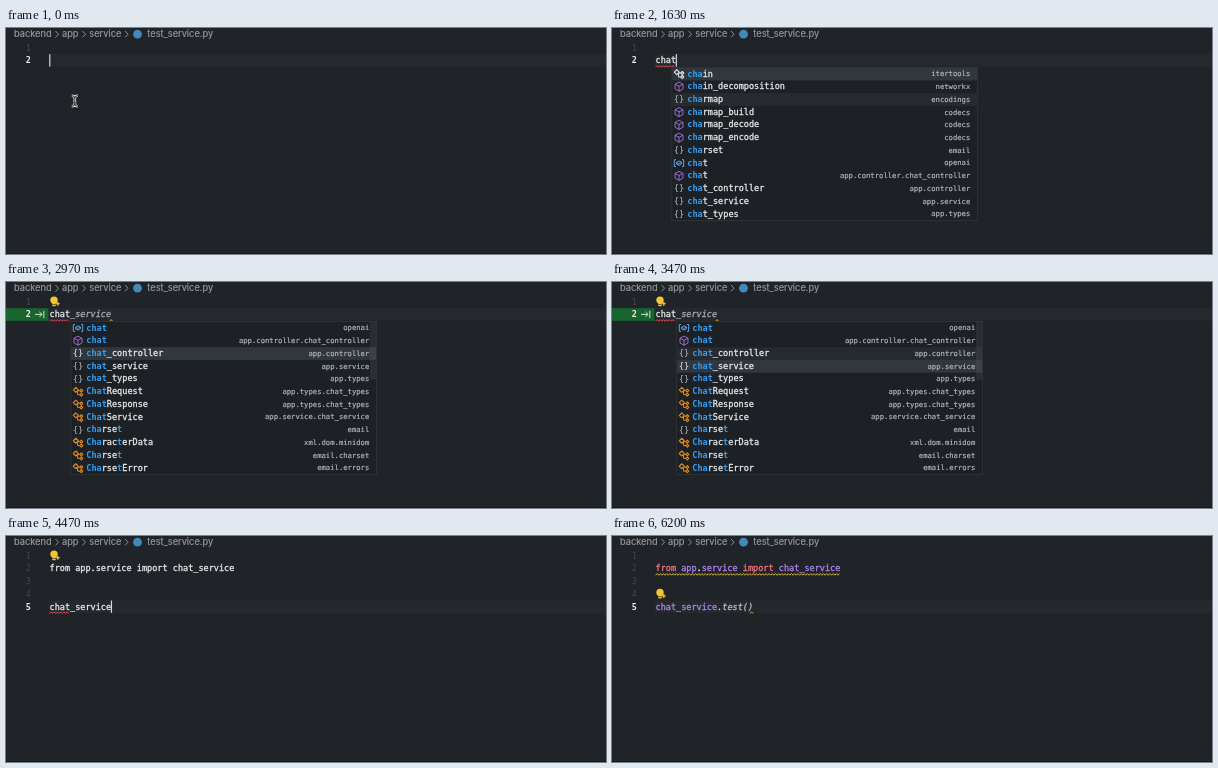
Recreate the animation shown at these times as an HTML page with a canvas. Size 600 by 226 pixels, loop 6.29 s.

```html
<!DOCTYPE html>
<html lang="en">
<head>
<meta charset="utf-8">
<title>Code completion</title>
<style>
html, body { margin: 0; width: 100%; height: 100%; overflow: hidden; background: #202327; }
canvas { display: block; width: 600px; height: 226px; }
</style>
</head>
<body>
<canvas id="stage"></canvas>
<script>
const LOOP = 6290, CH = 5.137, LEFT = 43.5, ROW = 12.74;
const MONO = '"DejaVu Sans Mono", monospace';
const SANS = 'Inter, "Open Sans", sans-serif';
const C = {
  bg: '#202327', line: '#25292d', text: '#e6e9ec', dim: '#41464c', crumb: '#989ca1',
  purple: '#ab85ea', pink: '#f07581', blue: '#319ff2', orange: '#e08a1e',
  red: '#e5484d', yellow: '#d9b52c', ghost: '#a9adb2'
};

const canvas = document.getElementById('stage');
const g = canvas.getContext('2d');
const dpr = window.devicePixelRatio || 1;
canvas.width = 600 * dpr;
canvas.height = 226 * dpr;

// label, module, icon kind
const firstList = [
  ['chain', 'itertools', 'class'], ['chain_decomposition', 'networkx', 'cube'],
  ['charmap', 'encodings', 'module'], ['charmap_build', 'codecs', 'cube'],
  ['charmap_decode', 'codecs', 'cube'], ['charmap_encode', 'codecs', 'cube'],
  ['charset', 'email', 'module'], ['chat', 'openai', 'var'],
  ['chat', 'app.controller.chat_controller', 'cube'],
  ['chat_controller', 'app.controller', 'module'],
  ['chat_service', 'app.service', 'module'], ['chat_types', 'app.types', 'module']
];
const secondList = [
  ['chat', 'openai', 'var'], ['chat', 'app.controller.chat_controller', 'cube'],
  ['chat_controller', 'app.controller', 'module'], ['chat_service', 'app.service', 'module'],
  ['chat_types', 'app.types', 'module'], ['ChatRequest', 'app.types.chat_types', 'class'],
  ['ChatResponse', 'app.types.chat_types', 'class'],
  ['ChatService', 'app.service.chat_service', 'class'], ['charset', 'email', 'module'],
  ['CharacterData', 'xml.dom.minidom', 'class'], ['Charset', 'email.charset', 'class'],
  ['CharsetError', 'email.errors', 'class']
];

// Latest value whose start time has passed
const pick = (t, steps) => steps.reduce((v, [at, next]) => t >= at ? next : v, steps[0][1]);
const between = (t, a, b) => t >= a && t < b;

const timeline = {
  typed: [[0, ''], [690, 'c'], [960, 'ch'], [1270, 'cha'], [1530, 'chat'], [4470, 'chat_service']],
  popup: [[0, 0], [1370, 1], [1720, 2], [4470, 0]],
  selected: [[0, 0], [2560, 1], [2900, 2], [3200, 3]],
  caret: [[0, 1], [70, 0], [630, 1], [1930, 0], [4470, 1], [5430, 0], [5930, 1], [6090, 0]],
  bulb: [[0, 0], [1960, 1], [4800, 4]]
};

const lineY = n => 19.6 + (n - 1) * 12.77;

function box(x, y, w, h, color) {
  g.fillStyle = color;
  g.fillRect(x, y, w, h);
}

// weight adds a thin outline for a heavier face
function text(s, x, y, color, font, align = 'left', weight = 0) {
  g.font = font;
  g.fillStyle = g.strokeStyle = color;
  g.textAlign = align;
  g.fillText(s, x, y);
  if (!weight) return;
  g.lineWidth = weight;
  g.lineJoin = 'round';
  g.strokeText(s, x, y);
}

function code(s, col, n, color, style = '') {
  text(s, LEFT + col * CH, lineY(n) + 3, color, `${style} 8.533px ${MONO}`, 'left', 0.3);
}

function stroke(points, color, width = 0.8, close = false) {
  g.beginPath();
  points.forEach(([x, y], i) => i ? g.lineTo(x, y) : g.moveTo(x, y));
  if (close) g.closePath();
  g.strokeStyle = color;
  g.lineWidth = width;
  g.stroke();
}

function squiggle(x1, x2, n, color) {
  const pts = [];
  for (let x = x1, i = 0; x <= x2; x += 1.6, i++) pts.push([x, lineY(n) + (i % 2 ? 5.2 : 6.9)]);
  stroke(pts, color, 1);
}

function breadcrumbs() {
  const font = `9.25px ${SANS}`;
  [['backend', 8], ['app', 56], ['service', 83.3], ['test_service.py', 141.3]]
    .forEach(([s, x]) => text(s, x, 9.2, C.crumb, font, 'left', 0.15));
  [49.5, 76.5, 119].forEach(x => stroke([[x, 3], [x + 3, 6.2], [x, 9.4]], C.crumb, 0.9));
  g.fillStyle = '#4189b8';
  g.beginPath();
  g.arc(131.5, 6.2, 4.4, 0, 7);
  g.fill();
}

function bulb(n) {
  const y = lineY(n) - 1.5;
  g.fillStyle = '#f3c530';
  g.beginPath();
  g.arc(48, y, 3.7, 0, 7);
  g.fill();
  box(46.3, y + 2.5, 3.4, 3.6, '#f3c530');
  box(46.3, y + 4.1, 3.4, 0.6, C.bg);
  stroke([[51.8, y + 1.6], [51.8, y + 5.6]], '#f3c530', 1.2);
  stroke([[49.9, y + 3.6], [53.7, y + 3.6]], '#f3c530', 1.2);
}

function pointer() {
  const x = 68.8, y = 73;
  const shape = () => {
    g.beginPath();
    for (const s of [-1, 1]) {
      g.moveTo(x - 3, y + s * 5.2);
      g.quadraticCurveTo(x, y + s * 5.2, x, y + s * 3);
      g.quadraticCurveTo(x, y + s * 5.2, x + 3, y + s * 5.2);
    }
    g.moveTo(x, y - 4);
    g.lineTo(x, y + 4);
    g.moveTo(x - 1.5, y + 1.8);
    g.lineTo(x + 1.5, y + 1.8);
  };
  for (const [color, width] of [['#e8e8e8', 2.6], ['#17191b', 0.9]]) {
    shape();
    g.strokeStyle = color;
    g.lineWidth = width;
    g.stroke();
  }
}

const icons = {
  module(x, y, c = '#b4b9be') {
    text('{', x - 2.7, y + 2.8, c, `8.8px ${MONO}`, 'center');
    text('}', x + 2.7, y + 2.8, c, `8.8px ${MONO}`, 'center');
  },
  cube(x, y, c = '#a277dd') {
    stroke([[x, y - 4.5], [x + 4, y - 2.4], [x + 4, y + 2.3], [x, y + 4.6],
      [x - 4, y + 2.3], [x - 4, y - 2.4]], c, 0.9, true);
    stroke([[x - 4, y - 2.4], [x, y - 0.3], [x + 4, y - 2.4]], c, 0.9);
    stroke([[x, y - 0.3], [x, y + 4.6]], c, 0.9);
  },
  var(x, y, c = '#6cb6f5') {
    for (const s of [-1, 1])
      stroke([[x + s * 3, y - 3.4], [x + s * 4.7, y - 3.4], [x + s * 4.7, y + 3.4], [x + s * 3, y + 3.4]], c, 0.9);
    stroke([[x - 2.4, y - 0.5], [x, y - 2.1], [x + 2.4, y - 0.9], [x + 2.4, y + 0.9],
      [x, y + 2.2], [x - 2.4, y + 1]], c, 0.9, true);
    stroke([[x - 2.4, y - 0.5], [x, y + 0.6], [x + 2.4, y - 0.9]], c, 0.7);
  },
  class(x, y, c = C.orange) {
    const diamond = (a, b, r) => stroke([[a, b - r], [a + r, b], [a, b + r], [a - r, b]], c, 1.1, true);
    diamond(x - 2.2, y - 1.8, 2.5);
    diamond(x + 3.3, y - 0.9, 1.5);
    diamond(x + 3.3, y + 3.1, 1.5);
    stroke([[x, y - 0.9], [x + 1.8, y - 0.9]], c, 1);
    stroke([[x - 0.4, y - 0.9], [x - 0.4, y + 3.1], [x + 1.8, y + 3.1]], c, 1);
  }
};

function label(s, x, y, withT) {
  const hit = withT ? s.indexOf('t') : -1;
  [...s].forEach((ch, i) => {
    const on = i < 3 || i === hit;
    text(ch, x + i * CH, y, on ? C.blue : C.text, `${on ? 'bold' : ''} 8.533px ${MONO}`, 'left', on ? 0 : 0.3);
  });
}

function popup(kind, selected) {
  const x = kind === 1 ? 59.5 : 64.5, top = 39.5;
  const list = kind === 1 ? firstList : secondList;
  box(x, top - 0.5, 306.5, 154, '#34393e');
  box(x + 0.7, top + 0.2, 305.1, 152.6, '#1d2024');
  list.forEach(([name, mod, icon], i) => {
    const y = 45.9 + i * ROW, on = i === selected;
    if (on || i === 2) box(x + 0.7, y - 6.2, 305.1, ROW, on ? '#31373f' : '#272b30');
    icons[icon](x + 7.5, y, on ? C.text : undefined);
    label(name, x + 15.8, y + 2.6, kind === 2);
    text(mod, x + 298.8, y + 2.4, '#b3b7bc', `7.22px ${MONO}`, 'right', 0.18);
  });
  if (kind === 2) box(x + 299.5, top + 0.2, 6.2, 58, 'rgba(140,150,160,0.12)');
}

function gutter(t, active, lines) {
  if (between(t, 1960, 4470)) {
    box(0, 26.2, 42.5, 12.6, '#18662e');
    const y = 32.4;
    stroke([[29, y], [36, y]], '#e6eee8', 0.9);
    stroke([[33.4, y - 2.6], [36, y], [33.4, y + 2.6]], '#e6eee8', 0.9);
    stroke([[37.8, y - 3.6], [37.8, y + 3.6]], '#e6eee8', 0.9);
  }
  for (let n = 1; n <= lines; n++) {
    const on = n === active;
    text(n, 24.8, lineY(n) + 3, on ? '#eceff1' : C.dim, `${on ? 'bold' : ''} 8.533px ${MONO}`, 'right');
  }
}

function importLine(colored) {
  const tint = c => colored ? c : C.text;
  [['from', 0, C.pink], ['app', 5, C.purple], ['.', 8, C.text], ['service', 9, C.purple],
    ['import', 17, C.pink], ['chat_service', 24, C.purple]]
    .forEach(([s, col, c]) => code(s, col, 2, tint(c)));
}

function draw(t) {
  g.setTransform(dpr, 0, 0, dpr, 0, 0);
  box(0, 0, 600, 226, C.bg);
  box(0, 225, 600, 1, '#17191c');

  const done = t >= 4470, colored = t >= 4800;
  const active = done ? 5 : 2;
  const typed = pick(t, timeline.typed);
  const end = LEFT + typed.length * CH;

  box(LEFT - 1, lineY(active) - 6.4, 558, 12.8, C.line);
  breadcrumbs();
  gutter(t, active, active);

  if (done) importLine(colored);
  code(typed, 0, active, colored ? C.purple : C.text);
  if (typed && !colored) squiggle(LEFT, done ? LEFT + 4 * CH : end, active, C.red);
  if (t >= 5100) squiggle(LEFT, 228.5, 2, C.yellow);

  if (between(t, 1960, 4470)) {
    code('_service', 4, 2, C.ghost, t >= 2530 ? 'italic' : '');
    squiggle(103.5, 107.5, 2, C.yellow);
  }
  if (t >= 6090) {
    code('.test()', 12, 5, '#b9bdc1', 'italic');
    squiggle(138, 142.5, 5, C.yellow);
  }

  const bulbLine = pick(t, timeline.bulb);
  if (bulbLine) bulb(bulbLine);
  if (pick(t, timeline.caret)) box(end - 0.3, lineY(active) - 6.2, 1.2, 12.4, '#cfd8e4');
  if (t < 690) pointer();

  const kind = pick(t, timeline.popup);
  if (kind) popup(kind, pick(t, timeline.selected));
}

const start = performance.now();
function tick(now) {
  draw(Math.max(0, now - start) % LOOP);
  requestAnimationFrame(tick);
}
draw(0);
requestAnimationFrame(tick);
</script>
</body>
</html>
```
